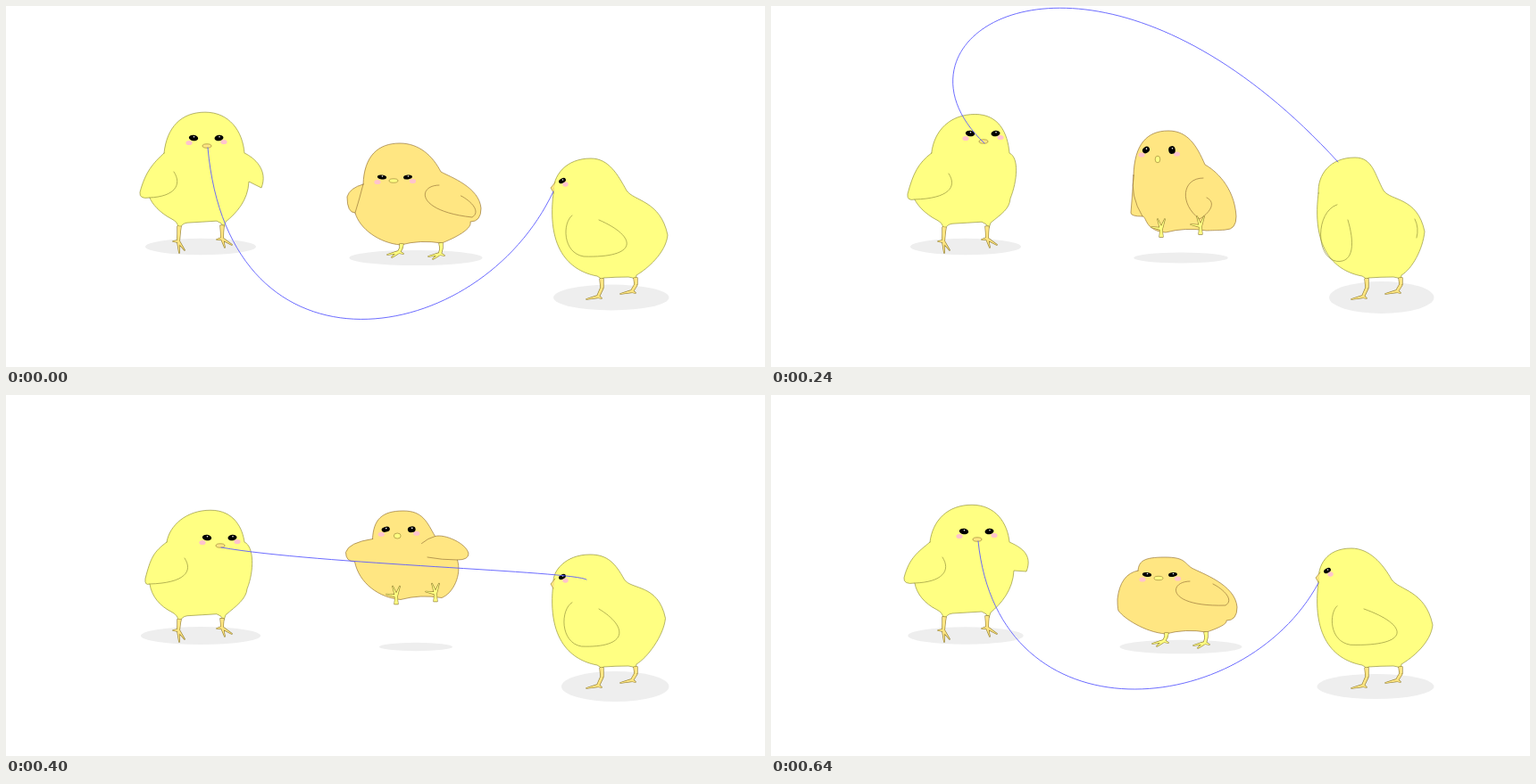
Write an HTML page that moves like this. It is 850x405 px and loops after 0.72 s.

```html
<!DOCTYPE html>
<html lang="en">
<head>
<meta charset="utf-8">
<title>Chicks skipping rope</title>
<style>
html, body { margin: 0; width: 100%; height: 100%; overflow: hidden; background: #fff; }
svg { display: block; width: 100%; height: 100%; }
.pose { visibility: hidden; animation: show 720ms step-end infinite; animation-delay: calc(var(--i) * 80ms - 720ms); }
@keyframes show { 0% { visibility: visible; } 11.1111% { visibility: hidden; } 100% { visibility: hidden; } }
path { fill: none; stroke-linejoin: round; stroke-linecap: round; }
.shadow { fill: #eee; }
.blush { fill: #ffc4cc; }
.rope { stroke: #5c5cff; stroke-width: .9; }
.lemon { --skin: #ffff82; --limb: #ffe682; --ink: #96943e; }
.honey { --skin: #ffe682; --limb: #ffff82; --ink: #98783c; }
.body, .line { stroke: var(--ink); stroke-width: .7; }
.body { fill: var(--skin); }
.beak { fill: var(--limb); stroke: #a08a3c; stroke-width: .7; }
.rim { stroke: #958238; stroke-width: 1.3; }
.limb { fill: var(--limb); }
</style>
</head>
<body>
<svg id="stage" viewBox="0 0 850 405"></svg>
<script>
const TICKS = 9, KEYS = [0, 1, 3, 4, 6, 8];

// A point moving through key positions, one per key tick, round the loop.
function track(text) {
  const at = text.split(' ').map(p => p.split(',').map(Number));
  return k => {
    const i = KEYS.findLastIndex(t => t <= k), j = (i + 1) % KEYS.length;
    const f = (k - KEYS[i]) / ((KEYS[j] || TICKS) - KEYS[i]);
    return at[i].map((v, n) => v + (at[j][n] - v) * f);
  };
}

const wave = (k, mid, amp, peak) => mid + amp * Math.cos(2 * Math.PI * (k - peak) / TICKS);
const add = ([x, y], dx, dy) => [x + dx, y + dy];
const path = (cls, d) => `<path class="${cls}" d="${d}"/>`;
const oval = (cls, [x, y], rx, ry, turn = 0) =>
  `<ellipse class="${cls}" cx="${x}" cy="${y}" rx="${rx}" ry="${ry}" transform="rotate(${turn} ${x} ${y})"/>`;

function taper([ax, ay], [bx, by], wa, wb) {
  const len = Math.hypot(bx - ax, by - ay) || 1;
  const nx = (ay - by) / len / 2, ny = (bx - ax) / len / 2;
  return `M${ax + nx * wa},${ay + ny * wa}L${bx + nx * wb},${by + ny * wb}` +
    `L${bx - nx * wb},${by - ny * wb}L${ax - nx * wa},${ay - ny * wa}Z`;
}

// Toes are offsets from the ankle.
function leg(hip, ankle, toes, bend = 0) {
  const knee = [(hip[0] + ankle[0]) / 2 + bend, (hip[1] + ankle[1]) / 2];
  const d = taper(hip, knee, 4, 3) + taper(knee, ankle, 3, 2.6) +
    toes.map(t => taper(ankle, add(ankle, ...t), 2.6, .4)).join('');
  return path('rim', d) + path('limb', d);
}

const eye = (p, rx, ry, turn) => oval('eye', p, rx, ry, turn) +
  `<circle cx="${p[0] + .5}" cy="${p[1] - ry * .4}" r=".8" fill="#fff"/>`;

// Eyes and cheeks sit at fixed offsets from the beak; surprise opens them up.
function face(beak, dx, lift, ry, surprise = 0) {
  const l = add(beak, dx[0], -lift), r = add(beak, dx[1], -lift);
  return oval('blush', add(l, -5, 5.5), 3.6, 2.6) + oval('blush', add(r, 5.5, 4.5), 3.6, 2.6) +
    eye(l, 5.2 - surprise, ry, 8 - 43 * surprise) + eye(r, 5 - 1.2 * surprise, ry + surprise, -8) +
    oval('beak', beak, 5 - 2.2 * surprise, 2.2 + 1.6 * surprise);
}

const leftBeak = track('225,157 225,151 238,152 247,163 233,175 231,162');
const leftTip = track('150,214 140,208 153,216 156,213 156,209 149,210');
const rightTip = track('286,204 290,193 268,216 266,222 274,213 286,198');

function leftChick(k) {
  const beak = leftBeak(k), [lx, ly] = leftTip(k), tip = rightTip(k);
  const lean = Math.max(0, Math.min(6, (beak[0] - 227) / 2));
  const top = [223 + lean, wave(k, 123.5, -6.5, 1.2)];
  const neck = [177 + lean / 2, 165], nape = [267, 165];
  const base = 243 + (top[1] - 121) * .45;
  const pit = tip[0] > 276 ? [272, 197] : tip;
  const body = `M${neck}C${neck[0] + 3},${top[1] + 17} ${add(top, -27, 0)} ${top}` +
    `C${add(top, 27, 0)} ${nape[0] - 2},${top[1] + 21} ${nape}` +
    `C${add(nape, 11, 5)} ${add(tip, 8, -20)} ${tip}L${pit}` +
    `C${pit[0] - 1},${(pit[1] + 240) / 2} 258,${base - 10} 246,${base}L244,${base + 6}Q242,${base + 1} 236,${base - 1}` +
    `Q220,${base} 203,${base + 1}Q196,${base + 2} 195,${base + 8}L193,${base + 6}Q192,${base} 186,${base - 3}` +
    `C172,${base - 10} 163,${base - 21} 161,${ly + 1}Q${lx - 1},${ly + 3} ${lx},${ly - 5}` +
    `C${lx + 6},${ly - 28} 165,176 ${neck}Z`;
  const fold = 2 * lean;
  const wing = `M161,${ly + 1}C${188 + fold},${ly} ${198 + fold},${ly - 13} ${188 + fold},${ly - 28}`;
  const rx = wave(k, 64, -4, 1.5);
  return oval('shadow', [218, 270], rx, rx * .15) + path('body', body) + path('line', wing) +
    leg([194, base + 5], [193, 264], [[-6, 0], [1, 13], [7, 10]]) +
    leg([242, base + 4], [242, 261], [[-6, 1], [3, 10], [11, 7]]) +
    face(beak, [-15, 13.5], 9, 3.3);
}

const midTop = track('441,154 443,149 445,140 446,129 444,131 441,182');
const midNeck = track('400,200 402,190 406,190 411,164 410,159 411,197');
const midNape = track('487,186 487,184 486,178 481,160 480,157 471,194');
const midTail = track('532,227 530,224 521,236 523,184 513,172 522,238');
const midBase = track('266 262 252 237 218 266');
const midPit = track('391,232 398,215 416,236 395,194 386,180 390,243');
const midTip = track('382,214 385,200 403,232 376,190 385,163 388,229');
const midWing = track('522,237 518,222 480,239 510,193 501,177 509,236');
const midBeak = track('434,196 433,189.5 433,172 437,162 439.5,154 434,205.5');

function middleChick(k) {
  const [top, neck, nape, tail, pit, tip, wing] =
    [midTop, midNeck, midNape, midTail, midPit, midTip, midWing].map(f => f(k));
  const base = midBase(k)[0], hip = [488, base];
  const spread = wing[1] < 200, airborne = base < 258;
  const side = spread ? wing : add(tail, -12, 15);
  const drop = base - side[1];
  const body = `M${neck}C${neck[0] + 1},${neck[1] - .7 * (neck[1] - top[1])} ${add(top, -24, 0)} ${top}` +
    `C${add(top, 22, 0)} ${add(nape, -9, -.55 * (nape[1] - top[1]))} ${nape}` +
    `C${add(nape, 11, spread ? -3 : 6)} ${add(tail, -2, -.58 * (tail[1] - nape[1]))} ${tail}` +
    `Q${tail[0]},${side[1]} ${side}` +
    `C${add(side, drop * .12, drop * .4)} ${add(hip, drop * .3, -drop * .12)} ${hip}` +
    `Q464,${base - 4} 442,${base + 2}C418,${base} ${pit[0] + 5},${base - 16} ${pit}` +
    `Q${tip[0]},${pit[1]} ${tip}Q${tip[0] + 3},${neck[1] + 4} ${neck}Z`;

  const start = add(nape, -2, 15), end = [(start[0] + wing[0]) / 2 + 6, wing[1] - 24];
  const fold = spread
    ? `M${nape}q-8,2 -15,8M${side}Q488,${side[1]} 472,182`
    : `M${start}C${add(start, -24, 0)} ${add(start, -27, 29)} ${wing}C${add(wing, 10, -6)} ${add(end, 12, 6)} ${end}`;
  const edge = !spread && pit[0] - tip[0] > 5
    ? path('line', `M${neck}Q${neck[0] - 4},${(neck[1] + pit[1]) / 2} ${pit}`) : '';

  const legs = airborne
    ? [[437, base + 7], [481, base + 4]].map(h => leg(h, add(h, 0, -9), [[-11, -2], [-4, -11], [4, -11]]))
    : [[443, base + 1], [487, base]].map((h, i) => leg(h, [440 + 46 * i, 276 + 2 * i], [[-13, 3], [-8, 6], [5, 2]], 1));
  const surprise = Math.max(0, Math.sin(Math.PI * k / 6));
  const rx = wave(k, 58, 17, .3);
  return oval('shadow', [459, 282.5], rx, rx * .115) + path('body', body) + path('line', fold) + edge +
    legs.join('') + face(midBeak(k), [-13, 16], 4 + 6.5 * surprise, 2.4 + surprise, surprise);
}

const farTop = track('655,171 653,170 654,170 653,180 655,178 650,172');
const farTail = track('741,257 737,262 732,253 736,243 741,258 741,258');
const farWing = track('695 679 650 667 706 701');

function rightChick(k) {
  const top = farTop(k), tail = farTail(k), edge = farWing(k)[0];
  const away = edge < 670, turn = 695 - edge;
  const nape = [tail[0] - 46, 207];
  const body = `M613,210C612,${top[1] + 19} ${add(top, -28, 0)} ${top}` +
    `C${add(top, 20, 0)} ${add(nape, -10, -18)} ${nape}C${add(nape, 8, 12)} ${add(tail, -8, -39)} ${tail}` +
    `C${add(tail, -2, 20)} 718,295 706,302L705,308Q703,304 697,304Q683,304 669,305L667,309Q666,304 662,303` +
    'C640,299 604,282 613,210Z';

  // The far edge of the wing fixes the rest of its outline.
  const near = 627 - turn * .3, high = 235 - turn * .27, low = 281 + turn * .12;
  const end = Math.min(edge - 4, 664), pull = (8 * edge - near - 20 - end) / 6;
  const wing = `M634,${high}C${near - 4},${high + 8} ${near - 4},${low - 4} ${near + 20},${low}` +
    `C${pull},${low + 2} ${pull},${low - 22} ${end},240`;

  const look = [623, top[1] + 25];
  const head = away ? path('line', `M${add(tail, -11, -14)}q5,10 2,21`)
    : oval('blush', add(look, 3.5, 4), 3.2, 2.8) + eye(look, 4.2, 2.6, -28) +
      path('beak', `M${add(look, -8, 2)}L${add(look, -13, 8)}L${add(look, -10, 13)}`);
  const rx = wave(k, 62, -3.5, 3.5);
  const toes = [[-13, 3], [4, 2]];
  return oval('shadow', [742.5 - rx, 327], rx, wave(k, 16, 2, 3.5)) + path('body', body) + path('line', wing) +
    leg([667, 306], [663, 326], toes, 2.5) + leg([705, 305], [701, 320], toes, 2.5) + head;
}

const ropeEnd = track('613,208 613,208 635,175 687,191 613,223 613,211');
const ropeNear = track('250,430 35,250 108,30 370,80 330,300 255,390');
const ropeFar = track('530,385 130,520 362,-124 720,90 550,305 530,365');
const rope = k => path('rope', `M${add(leftBeak(k), 1, 2)}C${ropeNear(k)} ${ropeFar(k)} ${ropeEnd(k)}`);

const group = (cls, inner) => `<g class="${cls}">${inner}</g>`;
document.getElementById('stage').innerHTML = Array.from({ length: TICKS }, (_, k) =>
  `<g class="pose" style="--i:${k}">` + group('lemon', leftChick(k) + rightChick(k)) +
  group('honey', middleChick(k)) + rope(k) + '</g>').join('');
</script>
</body>
</html>
```
